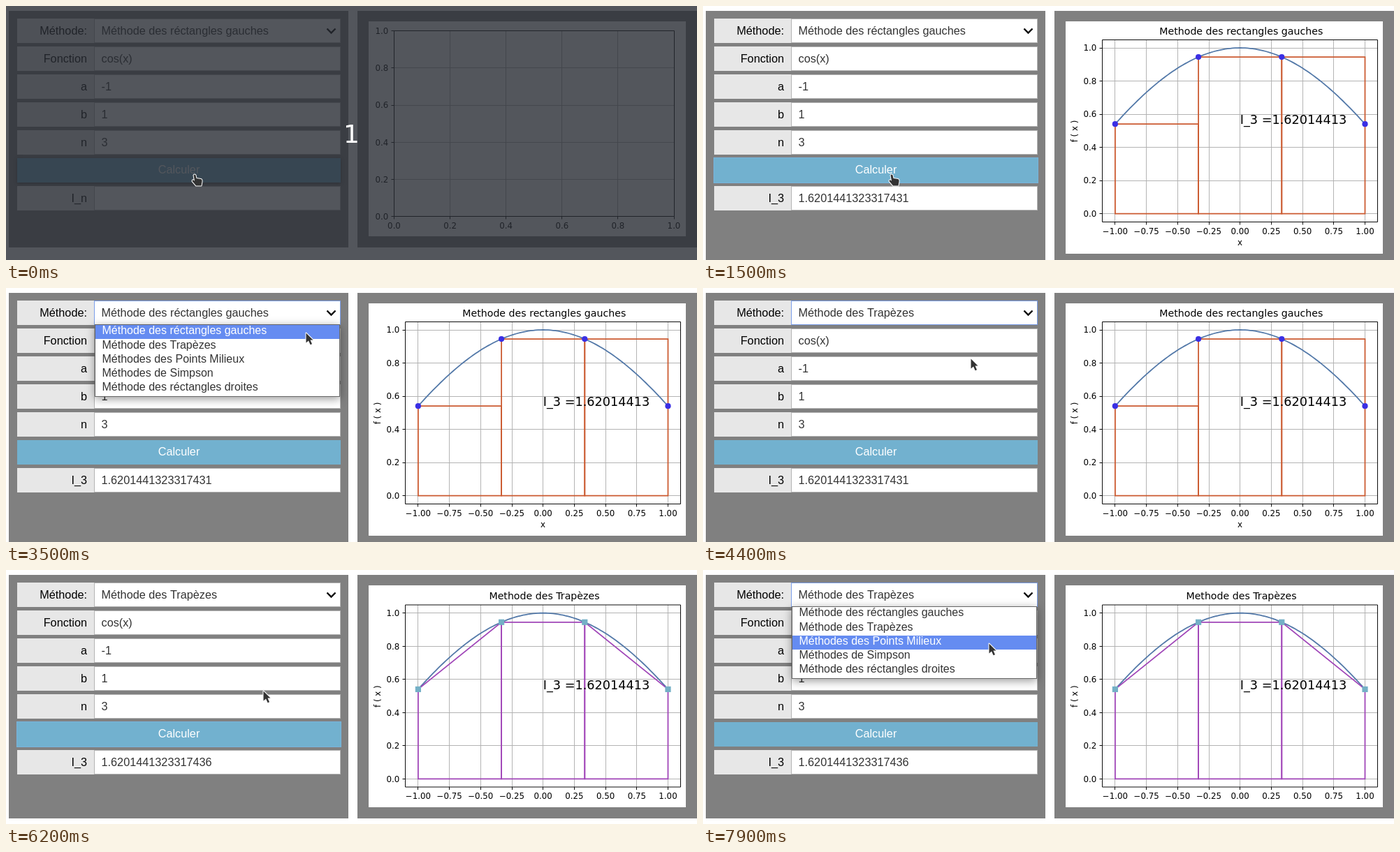
These frames come from a looping animation (989x364 px, 8000 ms). An HTML page with a canvas:

```html
<!DOCTYPE html>
<html lang="fr">
<head>
<meta charset="utf-8">
<title>Intégration numérique</title>
<style>
html, body { margin: 0; width: 100%; height: 100%; overflow: hidden; background: #fff; }
canvas { display: block; }
</style>
</head>
<body>
<canvas id="stage" width="989" height="364"></canvas>
<script>
const ctx = document.getElementById('stage').getContext('2d');
const LOOP = 8000;
const UI = 'px "Liberation Sans", Arial, sans-serif';
const PLOT = 'px "DejaVu Sans", sans-serif';
const PT = 1.18; // plot point in pixels

const methods = ['Méthode des réctangles gauches', 'Méthode des Trapèzes',
  'Méthodes des Points Milieux', 'Méthodes de Simpson', 'Méthode des réctangles droites'];

// time, x, y of the pointer tip
const track = [
  [0, 270, 241], [1500, 270, 241], [1900, 505, 64], [2000, 505, 64], [2500, 465, 36],
  [3100, 465, 36], [3500, 429, 64], [3800, 402, 83], [4000, 402, 83], [4100, 397, 78],
  [4300, 397, 78], [5000, 296, 238], [5900, 296, 238], [6200, 368, 173], [6300, 368, 173],
  [6600, 427, 101], [6700, 427, 101], [7100, 466, 41], [7500, 466, 41], [7700, 436, 84],
  [7800, 436, 84], [7900, 409, 105], [LOOP, 409, 105]
];

function pointerAt(t) {
  const i = track.findIndex(k => k[0] > t);
  const [t0, x0, y0] = track[i - 1], [t1, x1, y1] = track[i];
  const u = (t - t0) / (t1 - t0);
  return [Math.round(x0 + (x1 - x0) * u), Math.round(y0 + (y1 - y0) * u)];
}

function box(x, y, w, h, fill, border) {
  ctx.fillStyle = fill;
  ctx.fillRect(x, y, w, h);
  if (border) {
    ctx.strokeStyle = border;
    ctx.lineWidth = 1;
    ctx.strokeRect(x + .5, y + .5, w - 1, h - 1);
  }
}

function shadowed(blur, dy, color, draw) {
  ctx.save();
  ctx.shadowBlur = blur;
  ctx.shadowOffsetY = dy;
  ctx.shadowColor = color;
  draw();
  ctx.restore();
}

function text(s, x, y, font, color, align = 'left') {
  ctx.font = font;
  ctx.fillStyle = color;
  ctx.textAlign = align;
  ctx.fillText(s, x, y);
}

function line(points, color, width, close) {
  ctx.beginPath();
  points.forEach(([x, y]) => ctx.lineTo(x, y));
  if (close) ctx.closePath();
  ctx.strokeStyle = color;
  ctx.lineWidth = width;
  ctx.stroke();
}

function drawForm(s) {
  const font = 16.25 + UI;
  const solved = s.value !== '';
  const rows = [['Méthode:', methods[s.method]], ['Fonction', 'cos(x)'], ['a', '-1'], ['b', '1'],
    ['n', '3'], null, [solved ? 'I_3' : 'I_n', s.value]];
  rows.forEach((row, i) => {
    if (!row) return;
    const y = 18 + 40 * i;
    box(16, y, 111, 35, '#e7e7e7');
    box(126, y, 353, 35, '#fff', i === 0 && s.selectFocus ? '#7a9eea' : '#b4b4b4');
    text(row[0], 116, y + 23, font, '#000', 'right');
    text(row[1], 136.5, y + 23, font, '#333');
  });
  line([[459.5, 32.5], [465.5, 38.5], [471.5, 32.5]], '#000', 2.4);

  const button = () => box(16, 218, 463, 35, s.pressed ? '#588ea2' : '#72b1cf');
  if (s.hover) shadowed(4, 1, 'rgba(0,0,0,.5)', button);
  else button();
  if (s.buttonFocus) {
    ctx.strokeStyle = '#78b4dc';
    ctx.lineWidth = 1;
    ctx.strokeRect(15.5, 217.5, 464, 36);
  }
  text('Calculer', 247.5, 240, font, '#fff', 'center');
}

function drawList(selected) {
  shadowed(12, 3, 'rgba(0,0,0,.4)', () => box(127, 52, 351, 104, '#fff'));
  box(127, 52, 351, 104, '#fff', '#666');
  methods.forEach((name, i) => {
    const y = 53 + 20.3 * i;
    if (i === selected) box(128, Math.round(y), 349, 20, '#658cf1');
    text(name, 137.5, Math.round(y + 13.2), 16 + UI, i === selected ? '#fff' : '#333');
  });
}

// Axes with grid, ticks and labels; X and Y map data to pixels
function drawAxes(left, top, right, bottom, xs, ys, X, Y, digits) {
  const font = 10 * PT + PLOT;
  const label = (v, d) => v.toFixed(d).replace('-', '−');
  const snap = v => Math.floor(v) + .5;
  xs.forEach(v => line([[snap(X(v)), top], [snap(X(v)), bottom]], '#b0b0b0', .95));
  ys.forEach(v => line([[left, snap(Y(v))], [right, snap(Y(v))]], '#b0b0b0', .95));
  return () => {
    xs.forEach(v => {
      line([[snap(X(v)), bottom], [snap(X(v)), bottom + 4]], '#000', .95);
      text(label(v, digits), X(v), bottom + 17.3, font, '#000', 'center');
    });
    ys.forEach(v => {
      line([[left - 4, snap(Y(v))], [left, snap(Y(v))]], '#000', .95);
      text(label(v, 1), left - 8.3, Y(v) + 4.4, font, '#000', 'right');
    });
    line([[left, top], [right, top], [right, bottom], [left, bottom]], '#000', .95, true);
  };
}

const steps = (from, step, n) => Array.from({ length: n }, (_, i) => from + step * i);

function drawEmptyPlot() {
  box(519, 22, 454, 308, '#fff');
  const ticks = steps(0, .2, 6);
  drawAxes(555.5, 35.5, 956.5, 301.5, ticks, ticks,
    v => 555.5 + 400.5 * v, v => 301.3 - 265.5 * v, 1)();
}

function drawPlot(trapezes) {
  const dy = trapezes ? 1.7 : 0;
  const X = v => 768.7 + 178.8 * v;
  const Y = v => 297.6 + dy - 237.6 * v;
  const f = Math.cos;
  const nodes = steps(-1, 2 / 3, 4);
  box(519, 22, 454, trapezes ? 318 : 333, '#fff');
  const frame = drawAxes(571.5, trapezes ? 50 : 48.5, 965.5, trapezes ? 311 : 309.5,
    steps(-1, .25, 9), steps(0, .2, 6), X, Y, 2);

  line(steps(-1, .02, 101).map(v => [X(v), Y(f(v))]), '#5278a8', 1.5 * PT);
  nodes.slice(0, 3).forEach((a, i) => {
    const b = nodes[i + 1];
    const end = trapezes ? f(b) : f(a);
    line([[X(a), Y(0)], [X(a), Y(f(a))], [X(b), Y(end)], [X(b), Y(0)]],
      trapezes ? '#a045b8' : '#cb5a30', 1.5 * PT, true);
  });
  nodes.forEach(v => {
    const x = X(v), y = Y(f(v));
    if (trapezes) return box(x - 4.1, y - 4.1, 8.2, 8.2, '#74b0c6');
    ctx.beginPath();
    ctx.arc(x, y, 4.1, 0, 7);
    ctx.fillStyle = '#3a2fe4';
    ctx.fill();
  });
  frame();

  const title = trapezes ? 'Methode des Trapèzes' : 'Methode des rectangles gauches';
  text(title, 770.5 - (trapezes ? 0 : .2), 40.7 + dy, 12 * PT + PLOT, '#000', 'center');
  text('I_3 =1.62014413', X(0), Y(f(1)), 15 * PT + PLOT, '#000');
  if (!trapezes) text('x', 768.5, 343, 10 * PT + PLOT, '#000', 'center');
  ctx.save();
  ctx.translate(536, 179.5 + dy);
  ctx.rotate(-Math.PI / 2);
  text('f ( x )', 0, 0, 10 * PT + PLOT, '#000', 'center');
  ctx.restore();
}

const arrow = new Path2D('M.5 .5V14.5L4 11.5L6.6 17.2L9 16.2L6.5 10.5H10.5Z');
const hand = new Path2D('M-1.5 1.5Q0-.5 1.5 1.5L2.5 6L9 7Q11 7.7 10.5 11L9.5 16.5H2L-3.5 10Q-3.5 7.7-1.5 8.5L0 9.7Z');

function drawPointer([x, y], onButton) {
  const shape = onButton ? hand : arrow;
  ctx.save();
  ctx.translate(x, y);
  ctx.lineJoin = 'round';
  ctx.lineWidth = 2;
  ctx.strokeStyle = '#fff';
  ctx.stroke(shape);
  ctx.fillStyle = '#333';
  ctx.fill(shape);
  ctx.restore();
}

function draw(t) {
  const tip = pointerAt(t);
  const during = (a, b) => t >= a && t < b;
  const onButton = tip[0] < 479 && tip[1] >= 218 && tip[1] < 253;
  const bottom = t < 1500 ? 346 : t < 5800 ? 371 : 356;

  box(0, 0, 989, 364, '#fff');
  box(4, 7, 486, bottom - 7, '#808080');
  box(503, 7, 486, bottom - 7, '#808080');

  const buttonFocus = during(1100, 2800) || during(5300, 7300);
  drawForm({
    method: t < 4000 ? 0 : 1,
    value: t < 1100 ? '' : t < 5400 ? '1.6201441323317431' : '1.6201441323317436',
    selectFocus: during(2800, 5300) || t >= 7300,
    buttonFocus,
    hover: onButton && !buttonFocus,
    pressed: during(5300, 5400)
  });

  if (t < 1500) drawEmptyPlot();
  else drawPlot(t >= 5600);

  if (during(2800, 4000)) drawList(tip[1] < 73 ? 0 : 1);
  if (t >= 7300) drawList(t < 7700 ? 1 : 2);

  if (t < 500) {
    box(0, 0, 989, 364, 'rgba(40,44,52,.8)');
    text('1', 494.5, 196, 36 + PLOT, '#fff', 'center');
  }
  drawPointer(tip, onButton);
}

function tick() {
  const t = performance.now() % LOOP;
  draw(Math.floor(t / 100) * 100); // the screen updates ten times a second
  requestAnimationFrame(tick);
}
tick();
</script>
</body>
</html>
```
